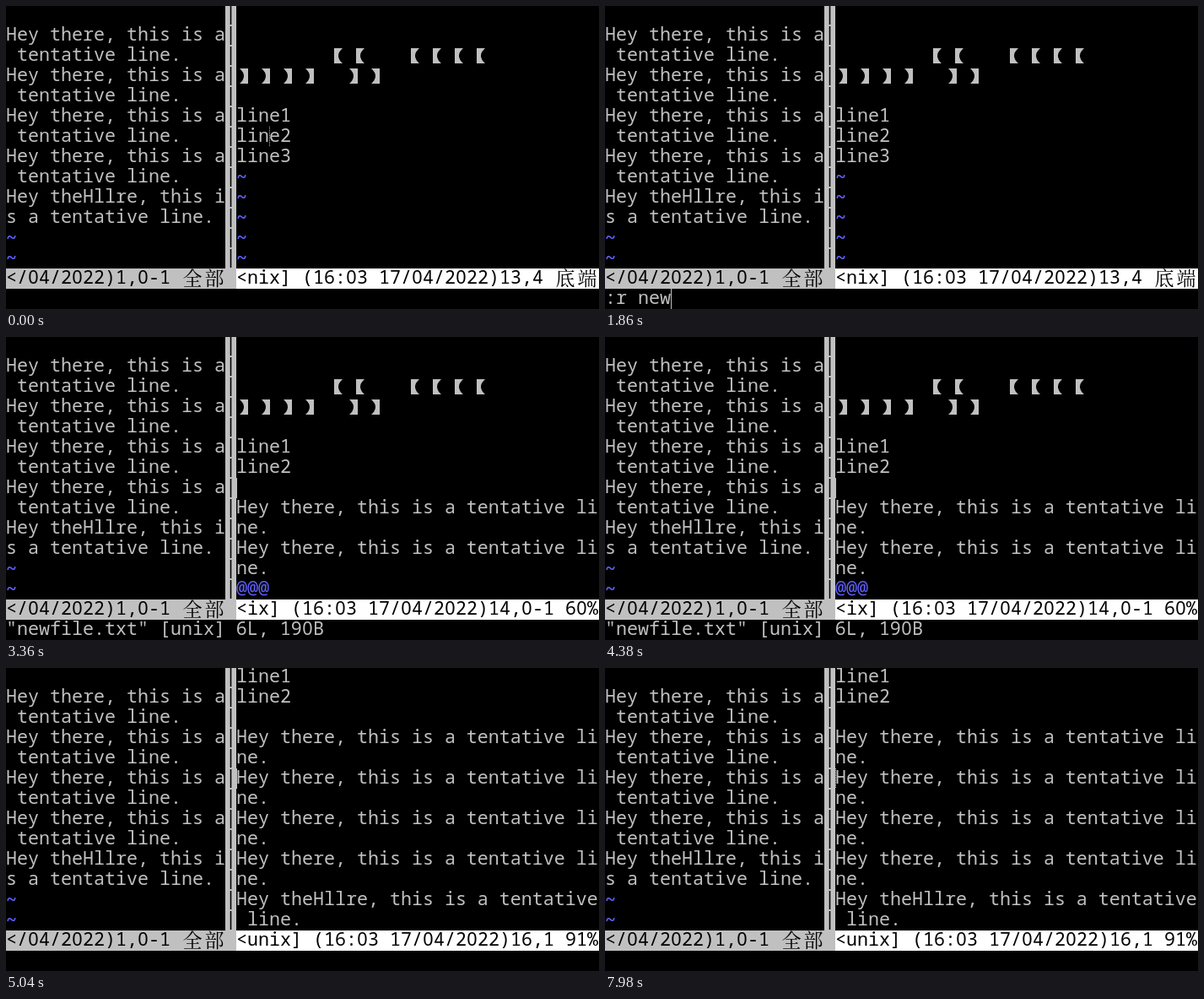
Animation, 703 px wide and 359 px high, one loop 8100 ms. Source, as an HTML page:

```html
<!DOCTYPE html>
<html lang="en">
<head>
<meta charset="utf-8">
<title>Reading a file into a split editor</title>
<style>
  html, body { margin: 0; width: 100%; height: 100%; overflow: hidden; background: #000; }
  svg { display: block; width: 703px; height: 359px; background: #000; }
  text { font: 500 21.667px "Noto Sans Mono", "DejaVu Sans Mono", monospace; white-space: pre; fill: #c0c0c0; }
  .zero { font-family: "Noto Sans", "Open Sans", sans-serif; }
  .cjk { font: 300 23px "Noto Serif CJK SC", "Noto Sans CJK SC", "Noto Sans CJK", serif; letter-spacing: 3px; }
  .blue text { fill: #6060ff; }
  .tilde text { fill: #6060ff; font-weight: 700; transform: translateY(1px); }
  .black text { fill: #000; }
  .bracket { fill: #c0c0c0; }
  #cursor { stroke: #c0c0c0; shape-rendering: crispEdges; }
  #cursor.dots { stroke-dasharray: 1 1; }
</style>
</head>
<body>
<svg id="stage" viewBox="0 0 703 359">
  <rect x="260" width="13" height="311" fill="#c0c0c0"/>
  <rect y="311" width="273" height="24" fill="#c0c0c0"/>
  <rect x="273" y="311" width="430" height="24" fill="#fff"/>
</svg>
<script>
const LOOP = 8100, CELL = 13, ROW = 24, STATUS = 13, COMMAND = 14, SPLIT = 21;
const stage = document.getElementById('stage');
const rowTop = row => row * ROW - 1;

function add(parent, tag, attrs = {}, content = '') {
  const el = document.createElementNS('http://www.w3.org/2000/svg', tag);
  for (const name in attrs) el.setAttribute(name, attrs[name]);
  el.textContent = content;
  parent.append(el);
  return el;
}

// Writes one row on the character grid; ideographs take two cells.
function write(parent, col, row, line, color = '') {
  const group = add(parent, 'g', { class: color });
  for (const part of line.match(/0|[\u4e00-\u9fff]+|[^0\u4e00-\u9fff]+/g) || []) {
    const wide = part >= '\u4e00', zero = part === '0';
    add(group, 'text', {
      x: col * CELL + (wide ? 1.5 : zero ? 0.3 : 0),
      y: rowTop(row) + (wide ? 20 : 18),
      class: wide ? 'cjk' : zero ? 'zero' : ''
    }, part);
    col += part.length * (wide ? 2 : 1);
  }
}

function writeRows(parent, col, row, lines, color) {
  lines.forEach((line, i) => write(parent, col, row + i, line, color));
}

function brackets(parent, row, xs, shape) {
  for (const x of xs) {
    add(parent, 'path', { class: 'bracket', d: shape, transform: `translate(${x} ${rowTop(row) + 3})` });
  }
}
const opening = (g, row) => brackets(g, row, [389, 415, 480, 506, 532, 558], 'M0 0H10Q0 9 10 18H0Z');
const closing = (g, row) => brackets(g, row, [277, 303, 329, 355, 407, 433], 'M10 0H0Q10 9 0 18H10Z');

const repeat = (count, lines) => Array(count).fill(lines).flat();
const wrapped = ['Hey there, this is a tentative li', 'ne.'];

// Left window
writeRows(stage, 0, 1, repeat(4, ['Hey there, this is a', ' tentative line.']));
writeRows(stage, 0, 9, ['Hey theHllre, this i', 's a tentative line.']);
writeRows(stage, 0, 11, ['~', '~'], 'tilde');
writeRows(stage, 20, 0, repeat(13, ['|']), 'black');
write(stage, 0, STATUS, '</04/2022)1,0-1 全部', 'black');

// Right window, one group per view
function view(status, draw) {
  const group = add(stage, 'g');
  write(group, SPLIT, STATUS, status, 'black');
  draw(group);
  return group;
}

const views = [
  view('<nix] (16:03 17/04/2022)13,4 底端', g => {
    opening(g, 2);
    closing(g, 3);
    writeRows(g, SPLIT, 5, ['line1', 'line2', 'line3']);
    writeRows(g, SPLIT, 8, repeat(5, ['~']), 'tilde');
  }),
  view('<ix] (16:03 17/04/2022)14,0-1 60%', g => {
    opening(g, 2);
    closing(g, 3);
    writeRows(g, SPLIT, 5, ['line1', 'line2', '', ...repeat(2, wrapped)]);
    write(g, SPLIT, 12, '@@@', 'blue');
    write(g, 0, COMMAND, '"newfile.txt" [unix] 6L, 190B');
  }),
  view('<unix] (16:03 17/04/2022)15,1 81%', g => {
    closing(g, 0);
    writeRows(g, SPLIT, 2, ['line1', 'line2', '', ...repeat(4, wrapped)]);
  }),
  view('<unix] (16:03 17/04/2022)16,1 91%', g => {
    writeRows(g, SPLIT, 0, ['line1', 'line2', '', ...repeat(4, wrapped)]);
    writeRows(g, SPLIT, 11, ['Hey theHllre, this is a tentative', ' line.']);
  })
];

const command = ':r newfile.txt';
const typed = add(stage, 'text', { x: 0, y: rowTop(COMMAND) + 18 });
const cursor = add(stage, 'line', { id: 'cursor', x1: 0.5, x2: 0.5, y1: 0, y2: ROW });

const viewTimes = [0, 3360, 4860, 5040];
const keyTimes = [780, 960, 1200, 1380, 1500, 1860, 2100, 2220, 2400, 2460, 2640, 2700, 2880, 3120];
const cursorCells = [[24, 6], [SPLIT, 7], [SPLIT, 5], [SPLIT, 5]];
const cursorLooks = [
  [0, 'dots'], [180, 'on'], [720, 'off'], [780, 'on'], [3840, 'off'], [4380, 'on'],
  [5580, 'off'], [6060, 'on'], [6600, 'off'], [7080, 'on'], [7620, 'off'], [7980, 'dots']
];
const passed = (times, t) => times.filter(time => time <= t).length;

function render(t) {
  const current = passed(viewTimes, t) - 1;
  views.forEach((group, i) => group.style.display = i === current ? '' : 'none');

  const keys = current === 0 ? passed(keyTimes, t) : 0;
  typed.textContent = command.slice(0, keys);

  const [col, row] = keys ? [keys, COMMAND] : cursorCells[current];
  const look = cursorLooks[passed(cursorLooks.map(step => step[0]), t) - 1][1];
  cursor.setAttribute('transform', `translate(${col * CELL} ${rowTop(row)})`);
  cursor.setAttribute('class', look);
  cursor.style.display = look === 'off' ? 'none' : '';
}

const start = performance.now();
function tick() {
  render((performance.now() - start) % LOOP);
  requestAnimationFrame(tick);
}
tick();
</script>
</body>
</html>
```
